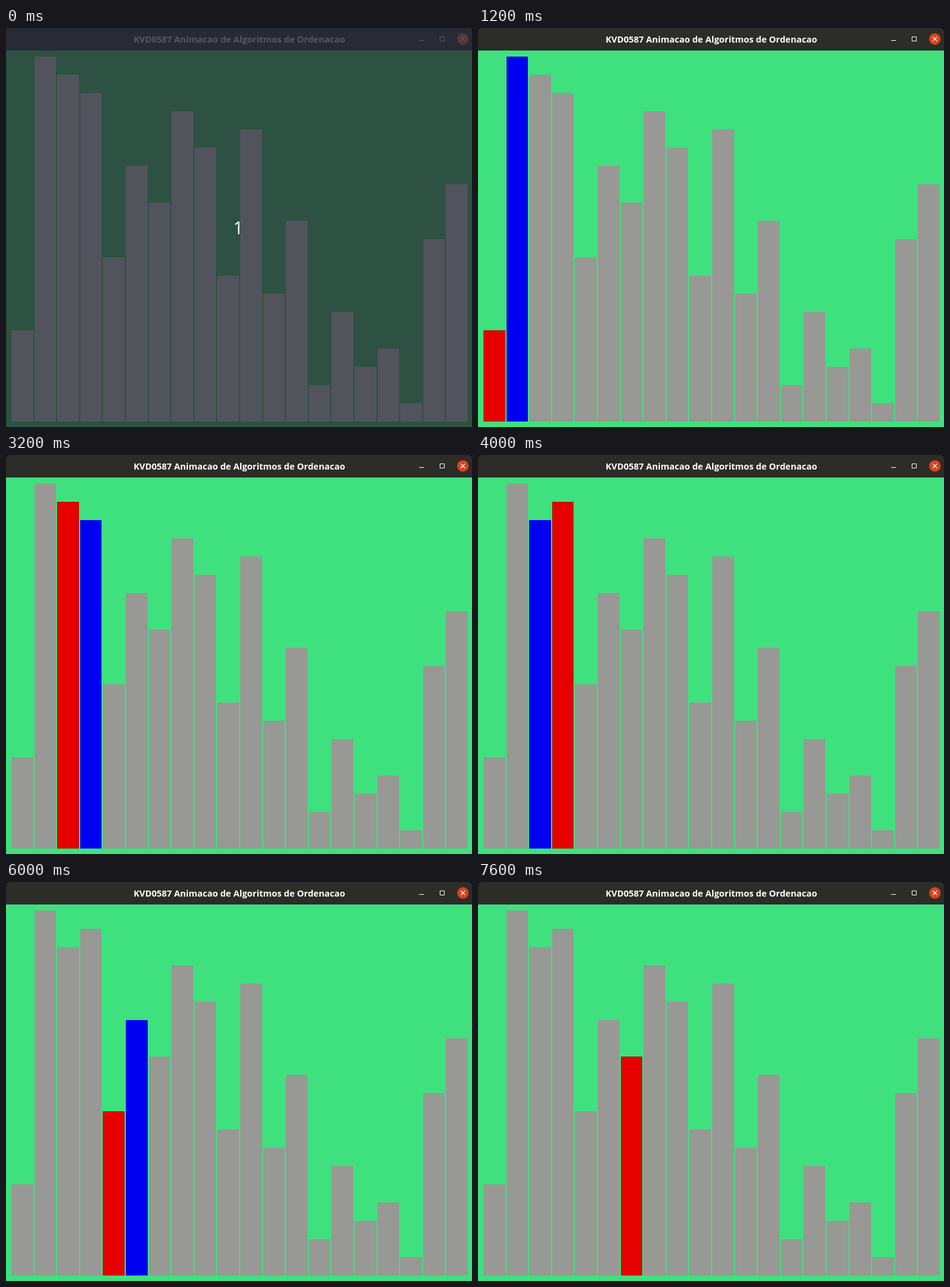
An HTML page for the animation above (8 s loop, 766 px wide and 656 px high).

```html
<!DOCTYPE html>
<html lang="pt">
<head>
<meta charset="utf-8">
<title>Ordenacao</title>
<style>
  html, body { margin: 0; width: 100%; height: 100%; overflow: hidden; }
  svg {
    display: block; width: 766px; height: 656px;
    --field: #3ee17d; --head: #2c2c28; --ink: #fffffc; --close: #d9421b;
    --w: #fffffc; --g: #989894; --corner: #080808;
  }
  svg.dim {
    --field: #2d5142; --head: #282b33; --ink: #56585d; --close: #58363a;
    --g: #52545b; --corner: #20232a;
  }
  .field { fill: var(--field); }
  .head { fill: var(--head); }
  .corner { fill: var(--corner); }
  .title { fill: var(--ink); font: 700 14.5px "Open Sans", "Noto Sans", sans-serif; text-anchor: middle; }
  .line { fill: none; stroke: var(--ink); }
  .close { fill: var(--close); }
  .count { display: none; fill: #f4fff8; font: 400 29px "Open Sans", "Noto Sans", sans-serif; }
  .dim .count { display: block; }
  .w { fill: var(--w); }
  .g { fill: var(--g); }
  .r { fill: #e60000; }
  .b { fill: #0000f0; }
  .edge { fill: none; stroke: #a80c00; }
</style>
</head>
<body>
<svg id="stage" class="dim" viewBox="0 0 766 656">
  <rect class="field" width="766" height="656"/>
  <rect class="corner" width="766" height="20"/>
  <path class="head" d="M0 37V6Q0 0 6 0H760Q766 0 766 6V37Z"/>
  <text class="title" x="383.5" y="24">KVD0587 Animacao de Algoritmos de Ordenacao</text>
  <path class="line" d="M679 20.5H687M713.5 14.5H720.5V21.5H713.5Z"/>
  <circle class="close" cx="751" cy="18" r="9.5"/>
  <path class="line" stroke-width="1.3" d="M747.5 14.5L754.5 21.5M754.5 14.5L747.5 21.5"/>
  <g id="bars" shape-rendering="crispEdges"></g>
  <text class="count" x="373.4" y="339">1</text>
</svg>
<script>
const STEP = 400, LOOP = 8000, BASE = 647, UNIT = 30, PITCH = 37.6, WIDTH = 35.6;
const values = [5, 20, 19, 18, 9, 14, 12, 17, 15, 8, 16, 7, 11, 2, 6, 3, 4, 1, 10, 13];
const SWAP_STEP = 9, SWAP_AT = 2;

// Each step: index of the first bar of the pair, then the colours of both.
const steps = [
  [0, "gg"], [0, "ww"], [0, "ww"],
  [0, "rb"], [0, "rg"], [0, "rb"], [0, "ww"], [0, "gg"],
  [2, "rb"], [2, "bg"], [2, "br"], [2, "br"], [2, "gg"],
  [4, "rb"], [4, "rg"], [4, "rb"], [4, "ww"], [4, "gg"],
  [6, "rb"], [6, "rg"]
];

const stage = document.getElementById("stage");
const group = document.getElementById("bars");

function addRect(attrs) {
  const rect = document.createElementNS("http://www.w3.org/2000/svg", "rect");
  setAttrs(rect, attrs);
  group.append(rect);
  return rect;
}

function setAttrs(el, attrs) {
  for (const key in attrs) el.setAttribute(key, attrs[key]);
}

const bars = values.map((_, i) => {
  const left = 9 + PITCH * i;
  const x = Math.round(left), width = Math.round(left + WIDTH) - x;
  return {
    x, width,
    body: addRect({ x, width }),
    edge: addRect({ class: "edge", x: x + 0.5, width: width - 1 })
  };
});

function draw(step) {
  const [first, pair] = steps[step];
  const rest = step === 1 ? "w" : "g";
  const order = values.slice();
  if (step >= SWAP_STEP) {
    [order[SWAP_AT], order[SWAP_AT + 1]] = [order[SWAP_AT + 1], order[SWAP_AT]];
  }
  stage.classList.toggle("dim", step === 0);
  bars.forEach(({ body, edge }, i) => {
    const color = pair[i - first] || rest;
    const height = order[i] * UNIT, y = BASE - height;
    setAttrs(body, { class: color, y, height });
    setAttrs(edge, { y: y + 0.5, height: height - 1 });
    edge.style.display = color === "r" ? "" : "none";
  });
}

const start = performance.now();
let shown = -1;

function tick() {
  const time = Math.max(0, performance.now() - start) % LOOP;
  const step = Math.floor(time / STEP);
  if (step !== shown) draw(shown = step);
  requestAnimationFrame(tick);
}
tick();
</script>
</body>
</html>
```
